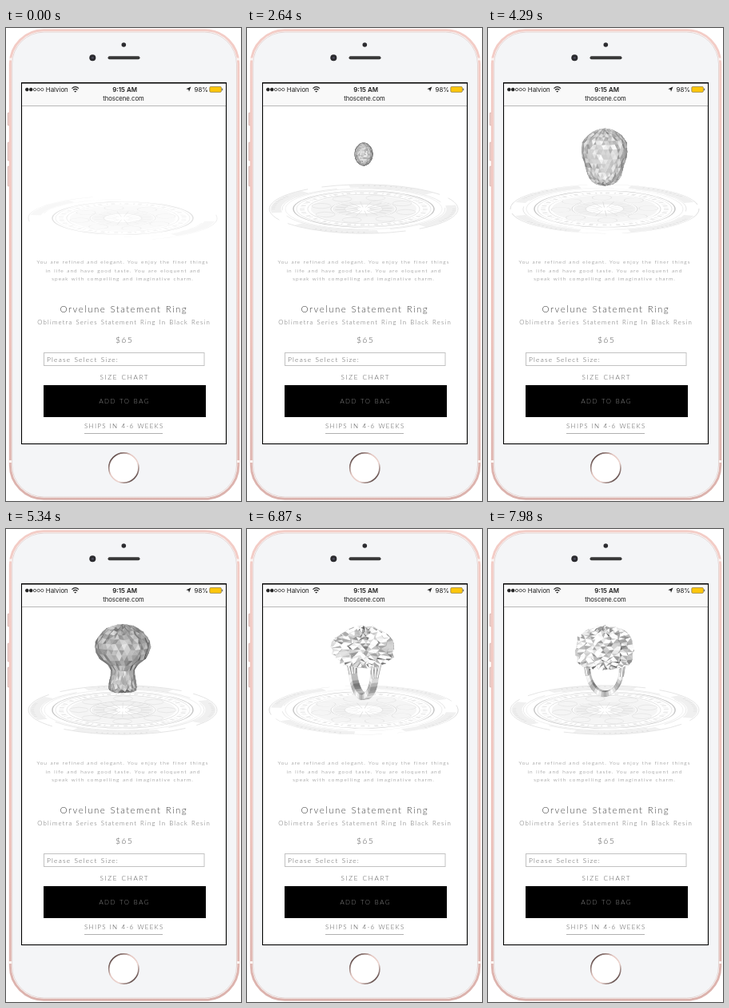
These frames come from a looping animation (294x592 px, 8 s). An HTML page with a canvas:

```html
<!DOCTYPE html>
<html lang="en">
<head>
<meta charset="utf-8">
<title>Ring shop</title>
<style>
html, body { margin: 0; width: 100%; height: 100%; overflow: hidden; background: #fff; }
svg { position: absolute; left: 0; top: 0; }
canvas { position: absolute; left: 21px; top: 100px; width: 253px; height: 165px; }
.page text { font-family: Lato, "Open Sans", sans-serif; font-weight: 300; text-anchor: middle; word-spacing: .6px; }
.bar text { font-family: Inter, Roboto, sans-serif; fill: #1c1c1c; }
.copy { font-size: 6.5px; letter-spacing: 1.07px; fill: #707070; }
</style>
</head>
<body>
<svg width="294" height="592" viewBox="0 0 294 592">
  <defs>
    <linearGradient id="rose" x1="0" y1="0" x2="0" y2="1">
      <stop offset="0" stop-color="#f3cdc7"/>
      <stop offset=".6" stop-color="#eec2bb"/>
      <stop offset="1" stop-color="#dbb2ad"/>
    </linearGradient>
    <linearGradient id="home" x1="0" y1="0" x2="1" y2="1">
      <stop offset=".1" stop-color="#4d3a38"/>
      <stop offset=".4" stop-color="#e6c9c3"/>
      <stop offset=".65" stop-color="#ecd4cf"/>
      <stop offset=".9" stop-color="#4a3735"/>
    </linearGradient>
  </defs>
  <g fill="#f0d8d3" stroke="#c9a09a" stroke-width=".6">
    <rect x="2.2" y="106" width="2" height="16" rx="1"/>
    <rect x="2.2" y="143" width="2" height="23" rx="1"/>
    <rect x="2.2" y="173" width="2" height="25" rx="1"/>
  </g>
  <rect x="5.3" y="2.8" width="285.5" height="586.5" rx="42" fill="#fff" stroke="url(#rose)" stroke-width="3"/>
  <rect x="7.6" y="5.1" width="280.9" height="581.9" rx="40" fill="#f4f5f7" stroke="#dcc6c3" stroke-width=".7"/>
  <path d="M4 39h3.2M289 39h3.2M4 542.5h3.2M289 542.5h3.2" stroke="#fbf3f1" stroke-width="3"/>
  <circle cx="147.3" cy="21" r="2.8" fill="#2c2c30"/>
  <circle cx="108.3" cy="37.3" r="4" fill="#2a2a2e"/>
  <circle cx="108.3" cy="37.3" r="1.4" fill="#484858"/>
  <rect x="127.5" y="35.3" width="40" height="4" rx="2" fill="#383838"/>
  <circle cx="147.3" cy="550.5" r="18.6" fill="#fff" stroke="url(#home)" stroke-width="1.6"/>
  <rect x="19.5" y="68.5" width="256" height="452" fill="#fff" stroke="#000" stroke-width="1.1"/>

  <g class="bar">
    <rect x="20" y="69" width="255" height="28" fill="#f9f9f9"/>
    <path d="M19 68.7h257" stroke="#000" stroke-width="1.5"/>
    <path d="M20 97.5h255" stroke="#b8b8b8"/>
    <g stroke="#222" stroke-width=".7" fill="#fff">
      <circle cx="26.3" cy="77" r="1.9" fill="#222"/>
      <circle cx="31.2" cy="77" r="1.9" fill="#222"/>
      <circle cx="36" cy="77" r="1.7"/>
      <circle cx="40.7" cy="77" r="1.7"/>
      <circle cx="45.3" cy="77" r="1.7"/>
    </g>
    <text x="49.8" y="79.9" font-size="7.9">Halvion</text>
    <g fill="none" stroke="#222" stroke-width="1.2">
      <path d="M82.4 75.6q4.3-3.8 8.6 0M84 77.5q2.7-2.3 5.4 0"/>
      <path d="M85.5 79l1.2 1.2l1.2-1.2z" fill="#222" stroke-width=".5"/>
    </g>
    <text x="148.6" y="79.9" font-size="7.9" font-weight="600" text-anchor="middle">9:15 AM</text>
    <path d="M231.4 73.6l-2.4 6.2l-.7-2.9l-2.9-.7z" fill="#222"/>
    <text x="235.6" y="79.9" font-size="7.9">98%</text>
    <rect x="254.8" y="73.5" width="14.6" height="6.8" rx="1.3" fill="#fdc60b" stroke="#8a7a48" stroke-width=".7"/>
    <path d="M270.7 75.6v2.6" stroke="#555"/>
    <text x="147" y="91.4" font-size="7.7" text-anchor="middle">thoscene.com</text>
  </g>

  <g class="page">
    <g class="copy">
      <text x="146" y="295">You are refined and elegant. You enjoy the finer things</text>
      <text x="146.5" y="305.6">in life and have good taste. You are eloquent and</text>
      <text x="146" y="316.3">speak with compelling and imaginative charm.</text>
    </g>
    <text x="147.4" y="355.7" font-size="11.5" letter-spacing="1.48" fill="#444">Orvelune Statement Ring</text>
    <text x="147.6" y="371" font-size="7.8" letter-spacing="1.22" fill="#666">Oblimetra Series Statement Ring In Black Resin</text>
    <text x="148" y="394" font-size="10.5" letter-spacing="1.2" fill="#555">$65</text>
    <rect x="47.5" y="406.5" width="200.5" height="16" fill="#fff" stroke="#c2c2c2"/>
    <text x="51" y="418" font-size="8.4" letter-spacing="1.22" fill="#555" style="text-anchor:start">Please Select Size:</text>
    <text x="148.3" y="440.2" font-size="8.1" letter-spacing="1.65" fill="#555">SIZE CHART</text>
    <rect x="47" y="447" width="203" height="40" fill="#000"/>
    <text x="148.2" y="469.7" font-size="7.8" letter-spacing="1.55" fill="#8c8c8c">ADD TO BAG</text>
    <text x="147.8" y="501" font-size="8" letter-spacing="1.27" fill="#555">SHIPS IN 4-6 WEEKS</text>
    <path d="M98 507.5h98" stroke="#b0b0b0"/>
  </g>
</svg>
<canvas id="stage"></canvas>
<script>
const LOOP = 8000, TAU = Math.PI * 2, CX = 146;
const cv = document.getElementById('stage');
const g = cv.getContext('2d');
const dpr = window.devicePixelRatio || 1;
cv.width = Math.round(253 * dpr);
cv.height = Math.round(165 * dpr);

const lerp = (a, b, k) => a + (b - a) * k;
const clamp = (v, a = 0, b = 1) => Math.max(a, Math.min(b, v));
const smooth = (t, a, b) => { const k = clamp((t - a) / (b - a)); return k * k * (3 - 2 * k); };
const rnd = (a, b) => { const v = Math.sin(a * 12.9898 + b * 78.233) * 43758.5453; return v - Math.floor(v); };
const grey = v => { const c = Math.round(clamp(v, 50, 255)); return `rgb(${c},${c},${c})`; };

const ROWS = 18, COLS = 30;
const oval = r => Array.from({ length: 13 }, (_, i) => r * Math.sin(Math.PI * i / 12));
// time, top, bottom, bump, edge brightness, facet contrast, profile radii
const KEYS = [
  [2000, 157, 162, 0, 105, 70, oval(2)],
  [2790, 141, 174, .01, 105, 75, oval(13.2)],
  [3330, 134, 181, .01, 105, 75, oval(19.5)],
  [4290, 127, 196, .03, 120, 65, [0, 8, 16, 23, 27, 28, 27, 24, 22, 19.5, 15, 9, 0]],
  [5340, 121, 203, .04, 95, 65, [0, 10, 20, 28, 33.5, 34, 28, 14, 14.5, 16.5, 17, 16, 0]],
  [6200, 122, 178, .11, 130, 130, [0, 9, 18, 26, 33, 36, 36, 34, 29, 24, 19, 12, 0]],
  [6870, 125, 170, .16, 150, 180, [0, 8, 16, 24, 31, 35, 36, 35, 32, 28, 22, 13, 0]],
  [8000, 124, 173, .11, 148, 180, [0, 10, 19, 26, 31, 33, 33.5, 33, 32, 30, 25, 16, 0]]
];

function sample(list, u) {
  const x = u * (list.length - 1), i = Math.min(Math.floor(x), list.length - 2);
  return lerp(list[i], list[i + 1], x - i);
}

function shapeAt(t) {
  let n = 1;
  while (n < KEYS.length - 1 && KEYS[n][0] < t) n++;
  const a = KEYS[n - 1], b = KEYS[n], k = clamp((t - a[0]) / (b[0] - a[0]));
  const [, top, bottom, bump, light, grain] = a.slice(0, 6).map((v, i) => lerp(v, b[i], k));
  return { top, bottom, bump, light, grain, radii: a[6].map((v, i) => lerp(v, b[6][i], k)) };
}

function poly(pts, fill, line, width = .4) {
  g.beginPath();
  pts.forEach(p => g.lineTo(p[0], p[1]));
  g.closePath();
  g.fillStyle = fill;
  g.fill();
  g.strokeStyle = line || fill;
  g.lineWidth = width;
  g.stroke();
}

function gem(t, turn) {
  const s = shapeAt(t), mid = (s.top + s.bottom) / 2, half = (s.bottom - s.top) / 2;
  const pts = Array.from({ length: ROWS + 1 }, (_, i) => Array.from({ length: COLS }, (_, j) => {
    const side = (i + j) % 2 ? 1 : -1;
    const k = 1 + s.bump * (side * .7 + rnd(i + 3, j) * .8 - .4);
    const r = sample(s.radii, i / ROWS) * k;
    const a = (j + i % 2 * .5) / COLS * TAU + turn;
    const z = r * Math.sin(a);
    return [CX + r * Math.cos(a), mid - half * Math.cos(Math.PI * i / ROWS) * k + z * .1, z];
  }));
  const tris = [];
  const add = (a, b, c, seed) => {
    const ux = b[0] - a[0], uy = b[1] - a[1], uz = b[2] - a[2];
    const vx = c[0] - a[0], vy = c[1] - a[1], vz = c[2] - a[2];
    const nz = ux * vy - uy * vx;
    if (nz <= 0) return;
    const nx = uy * vz - uz * vy, ny = uz * vx - ux * vz;
    const len = Math.hypot(nx, ny, nz) || 1;
    const shade = s.light + 105 * nz / len - 10 * ny / len - 8 * nx / len + s.grain * (seed - .5);
    tris.push({ p: [a, b, c], z: a[2] + b[2] + c[2], shade });
  };
  for (let i = 0; i < ROWS; i++) {
    for (let j = 0; j < COLS; j++) {
      const n = (j + 1) % COLS;
      const a = pts[i][j], b = pts[i][n], c = pts[i + 1][j], d = pts[i + 1][n];
      const s1 = rnd(i, j + 40), s2 = rnd(i + 17, j);
      if (i % 2) { add(a, d, b, s1); add(a, c, d, s2); add(d, a, b, s1); add(d, c, a, s2); }
      else { add(a, c, b, s1); add(b, c, d, s2); add(b, a, c, s1); add(d, b, c, s2); }
    }
  }
  tris.sort((a, b) => a.z - b.z);
  for (const q of tris) poly(q.p, grey(q.shade));
}

function band(t) {
  const show = smooth(t, 5500, 6300);
  if (!show) return;
  const k = (t - 6870) / 1110, phi = lerp(50, 12, k) * Math.PI / 180;
  const R = 23.5, cy = 174, tall = lerp(39, 35, clamp(k));
  const at = (x, y, z) => {
    const depth = x * Math.sin(phi) + z * Math.cos(phi);
    return [CX + x * Math.cos(phi) - z * Math.sin(phi), y + depth * .16, depth];
  };
  const on = (a, k, z) => at(R * k * Math.cos(a), cy + tall * k * Math.sin(a), z);
  const faces = [];
  const N = 22;
  for (let i = 0; i < N; i++) {
    const a = i / N * Math.PI, b = (i + 1) / N * Math.PI;
    const wave = 38 * Math.sin(i * 1.1);
    const face = (k1, z1, k2, z2, base) => {
      const p = [on(a, k1, z1), on(b, k1, z1), on(b, k2, z2), on(a, k2, z2)];
      faces.push({ p, z: p.reduce((s, v) => s + v[2], 0), c: base + wave });
    };
    face(.84, -5, .84, 5, 155);
    face(1, -5, 1, 5, 185);
    face(.84, -5, 1, -5, 195);
    face(.84, 5, 1, 5, 215);
  }
  g.globalAlpha = show;
  faces.sort((a, b) => a.z - b.z);
  for (const f of faces) poly(f.p, grey(f.c), grey(f.c - 12), .3);
  for (const side of [-1, 1]) {
    for (const z of [-8, 0, 8]) {
      const a = at(side * 22, cy + 10, z * .4), b = at(side * 25, 160, z);
      for (const [w, c] of [[3.4, '#8e8e8e'], [2.2, '#efefef']]) {
        g.beginPath();
        g.moveTo(a[0], a[1]);
        g.lineTo(b[0], b[1]);
        g.lineWidth = w;
        g.strokeStyle = c;
        g.stroke();
      }
    }
  }
  g.globalAlpha = 1;
}

function ring(r, color, width = 1, from = 0, to = TAU, dash = []) {
  g.beginPath();
  g.arc(0, 0, r, from, to);
  g.setLineDash(dash);
  g.lineWidth = width;
  g.strokeStyle = color;
  g.stroke();
  g.setLineDash([]);
}

function rays(n, r1, r2, color, width) {
  g.beginPath();
  for (let i = 0; i < n; i++) {
    const c = Math.cos(i / n * TAU), s = Math.sin(i / n * TAU);
    g.moveTo(r1 * c, r1 * s);
    g.lineTo(r2 * c, r2 * s);
  }
  g.lineWidth = width;
  g.strokeStyle = color;
  g.stroke();
}

function disc(turn, full) {
  g.save();
  g.translate(CX, full ? 226.5 : 238);
  g.scale(1, full ? .26 : .235);
  g.rotate(turn);
  g.globalAlpha = full ? 1 : .5;
  const blades = full ? 4 : 2;
  for (let i = 0; i < blades; i++) {
    const a = i / blades * TAU + .35;
    ring(110, '#f0f0f0', 13, a, a + (full ? 1 : .8));
    ring(118, '#dedede', 1, a - .3, a + 1.1);
    ring(102, '#e4e4e4', 1, a + .1, a + 1.4);
    if (full) ring(113, '#dedede', 4, a + .15, a + .75, [2, 5]);
  }
  if (full) ring(98, '#ececec', 1);
  ring(88, '#c6c6c6', 1.5);
  ring(84, '#e2e2e2', 1);
  ring(77, '#e8e8e8', 6, 0, TAU, [2, 4, 5, 6]);
  ring(70, '#dcdcdc', 1);
  ring(54, '#f5f5f5', 24);
  for (let i = 0; i < 8; i++) {
    const a = i / 8 * TAU;
    g.save();
    g.translate(55 * Math.cos(a), 55 * Math.sin(a));
    ring(12, '#e4e4e4', 1);
    g.restore();
  }
  ring(41, '#dadada', 1.2);
  ring(31, '#f0f0f0', 16);
  rays(16, 8, 36, '#dedede', 1);
  ring(24, '#e4e4e4', 1);
  g.restore();
}

function draw(t) {
  if (t >= 2010) t = Math.floor(t / 30) * 30;
  g.setTransform(dpr, 0, 0, dpr, -21 * dpr, -100 * dpr);
  g.clearRect(21, 100, 253, 165);
  g.lineJoin = 'round';
  const spin = -.68 * Math.max(0, t - 1740) / 1000;
  disc(t < 1740 ? (t < 570 ? -.2 : -.19) : spin + .1, t >= 1740);
  if (t >= 2010) {
    band(t);
    gem(t, -spin);
  }
}

const start = performance.now();
function tick() {
  draw((performance.now() - start) % LOOP);
  requestAnimationFrame(tick);
}
tick();
</script>
</body>
</html>
```
